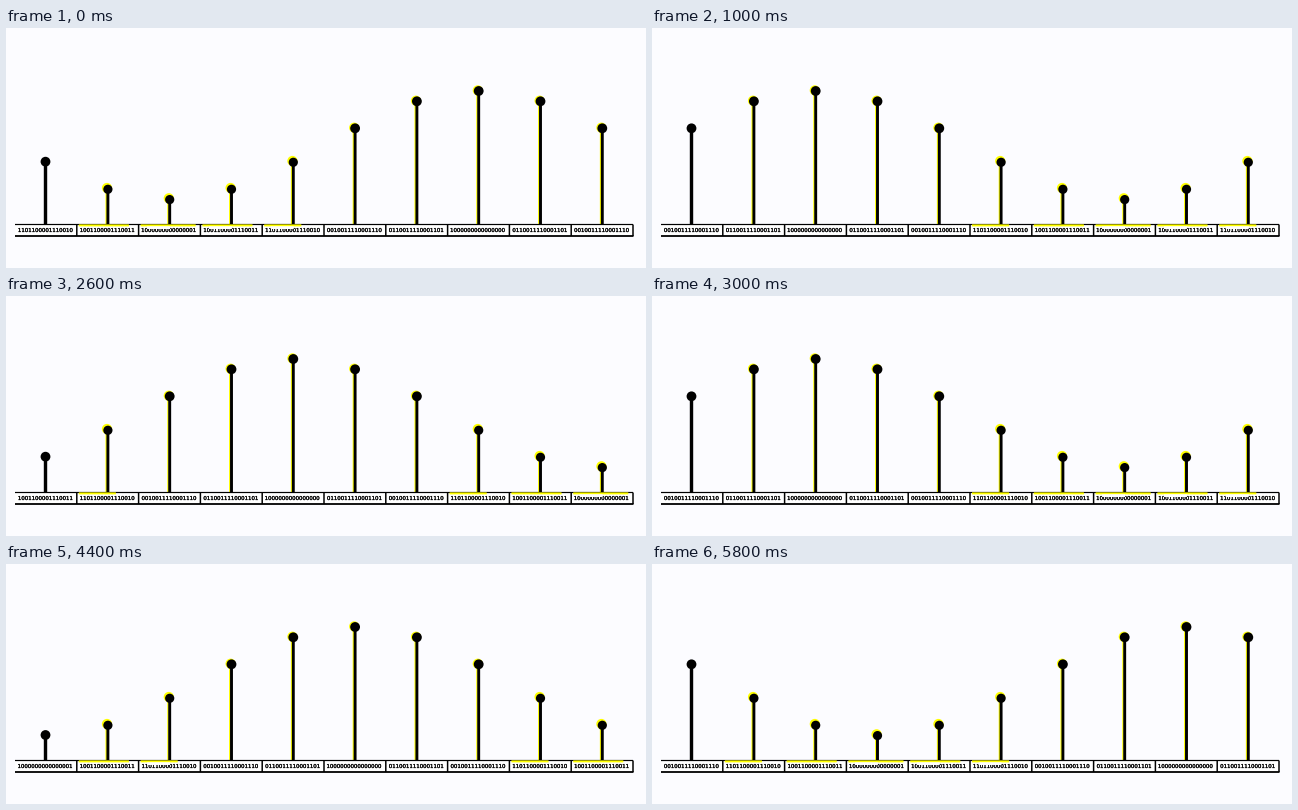
A matplotlib script that plays this animation: 640x240 px, repeating every 6000 ms.

```python
import numpy as np
import matplotlib.pyplot as plt
from matplotlib.animation import FuncAnimation
from matplotlib.patches import Circle, Rectangle
from matplotlib.patheffects import withStroke

W, H, DPI = 640, 240, 100
PX = 72 / DPI
CELLS, FRAMES, STEP = 10, 30, 200
LEFT, PITCH = 9, 61.8
TOP, BOTTOM = 196.5, 208
MID, AMP = 117, 54
YELLOW = "#ffff00"

plt.rcParams["path.snap"] = False
fig = plt.figure(figsize=(W / DPI, H / DPI), dpi=DPI, facecolor="#fcfcff")
ax = fig.add_axes([0, 0, 1, 1])
ax.set(xlim=(0, W), ylim=(H, 0))
ax.axis("off")


def line(xs, ys, width, color="black", z=2):
    return ax.plot(xs, ys, color=color, lw=width * PX, zorder=z,
                   solid_capstyle="butt")[0]


def word(level):
    """16-bit pattern of a sample between -1 and 1."""
    n = 0x8000 if level > 0.999 else round(32767 * level)
    return f"{n & 0xFFFF:016b}"


class Sample:
    def __init__(self, k):
        self.k = k
        self.lit = k > 0
        self.left = LEFT + k * PITCH
        mid = self.left + PITCH / 2 - 0.4
        self.x = x = mid + 0.6 * self.lit
        self.stem = line([x, x], [TOP, TOP], 2.9 if self.lit else 3.4)
        self.edge = line([x - 1.7] * 2, [TOP, TOP], 1.5, YELLOW, 1)
        self.glow = Circle((x, 0), 5.1, color=YELLOW, lw=0, zorder=1)
        self.dot = Circle((x, 0), 5, color="black", lw=0, zorder=4)
        self.rim = line([x, x], [TOP + 0.9] * 2, 2, YELLOW, 3)
        self.wipe = Rectangle((mid - 22, 198.4), 23, 2.6, color="white",
                              lw=0, zorder=6)
        for patch in (self.glow, self.dot, self.wipe):
            ax.add_patch(patch)
        self.text = ax.text(
            mid - 0.1, 202, "", family="DejaVu Sans", size=5.4 * PX,
            ha="center", va="center_baseline", zorder=5,
            path_effects=[withStroke(linewidth=0.25 * PX,
                                     foreground="black")])
        for part in (self.edge, self.glow):
            part.set_visible(self.lit)

    def show(self, i):
        phase = (self.k - 2 + i) % CELLS
        level = -np.cos(2 * np.pi * phase / CELLS)
        low = self.lit and level < 0
        y = MID - AMP * level + 0.6 * low
        self.stem.set_ydata([y, TOP])
        self.edge.set_ydata([y, TOP])
        self.dot.center = self.x, y
        self.dot.radius = 4.6 if low else 4.9
        self.glow.center = self.x - 0.9, y - (1.3 if low else 0.6)
        self.rim.set_xdata([self.left + 2, self.x - 26 * level])
        self.rim.set_visible(low)
        self.wipe.set_visible(phase <= 2 and self.k > 1)
        self.text.set_text(word(level))


right = LEFT + CELLS * PITCH
ax.add_patch(Rectangle((LEFT, TOP), right - LEFT, BOTTOM - TOP,
                       color="white", lw=0, zorder=0))
line([LEFT, right], [TOP, TOP], 1.2)
line([LEFT, right + 0.5], [BOTTOM, BOTTOM], 1.8)
for k in range(1, CELLS + 1):
    line([LEFT + k * PITCH] * 2, [TOP, BOTTOM], 1.5, z=4)

samples = [Sample(k) for k in range(CELLS)]


def draw(i):
    for s in samples:
        s.show(i)
    return []


anim = FuncAnimation(fig, draw, frames=FRAMES, interval=STEP, repeat=True,
                     repeat_delay=0, init_func=lambda: draw(0))
plt.show()
```
